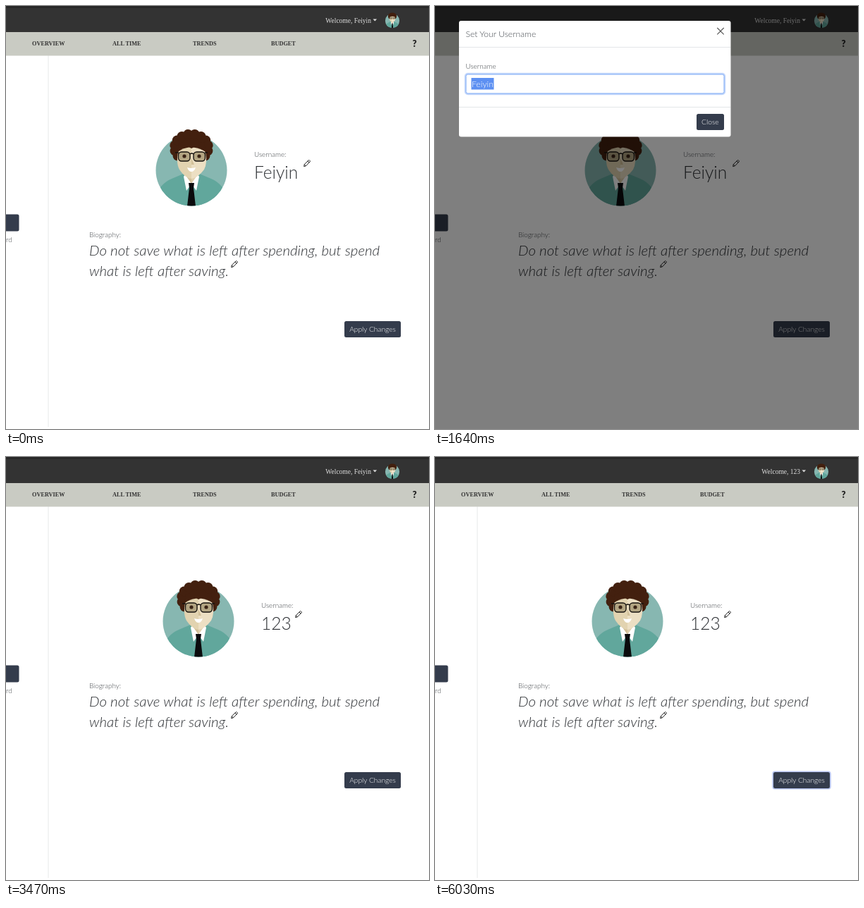
These frames come from a looping animation (600x600 px, 6.19 s). An HTML page:

```html
<!DOCTYPE html>
<html lang="en">
<head>
<meta charset="utf-8">
<title>Profile settings</title>
<style>
  html, body { margin: 0; width: 100%; height: 100%; overflow: hidden; background: #fff; }
  svg { display: block; width: 600px; height: 600px; }
  text { font: 300 10px Lato, "Open Sans", sans-serif; fill: #3c4043; white-space: pre; }
  .label { font-size: 9.9px; fill: #45494d; }
  .name { font-size: 24.5px; fill: #2c2f33; }
  .bio { font-size: 20.5px; font-style: italic; fill: #2c2f33; }
  .mid { font-size: 12.2px; fill: #454a50; }
  .button { font-size: 10.2px; fill: #fff; text-anchor: middle; }
  .welcome { font: 9.5px "Liberation Serif", serif; fill: #ddd; text-anchor: end; }
  .nav { font: bold 8.25px "Liberation Serif", serif; fill: #333; }
  .help { font: 900 13px Lato, sans-serif; fill: #222; text-anchor: middle; }
  .says { font: 9.2px "Open Sans", sans-serif; fill: #222; }
  .ok { font: 8px "Open Sans", sans-serif; fill: #fff; text-anchor: middle; }
  #alert { filter: drop-shadow(0 1px 2px rgba(0, 0, 0, .4)); }
</style>
</head>
<body>
<svg viewBox="0 0 600 600">
  <defs>
    <clipPath id="disc"><circle r="50.5"/></clipPath>
    <g id="avatar">
      <circle r="50.5" fill="#87b7b1"/>
      <g clip-path="url(#disc)">
        <path d="M-51 51V36Q-43 18 -28 12L-9 4H9L28 12Q43 18 51 36V51Z" fill="#61a79c"/>
        <path d="M-9 0H0V27L-9 12Z" fill="#d3c19a"/>
        <path d="M0 0H9V12L0 27Z" fill="#dfcfae"/>
        <path d="M-9 6L0 19L-7 29L-11 9ZM9 6L0 19L7 29L11 9Z" fill="#fff"/>
        <path d="M-4 18H4L3 25L6 51H-6L-3 25Z" fill="#0b0b0d"/>
      </g>
      <g id="hair" fill="#43200f"><ellipse cy="-33" rx="26" ry="21"/></g>
      <path d="M0-33Q-14-31-19-26Q-22-10-17-1Q-9 11 0 12Z" fill="#e2d3b0"/>
      <path d="M0-33Q14-31 20-26Q23-10 18-1Q9 11 0 12Z" fill="#ecdfc3"/>
      <path d="M-20-25Q-10-38 0-31Q12-38 21-25L18-38L0-45L-18-38Z" fill="#43200f"/>
      <g fill="#b3a582" stroke="#17130f" stroke-width="1.4">
        <rect x="-18.5" y="-26" width="16.5" height="13" rx="4.5"/>
        <rect x="3" y="-26" width="16.5" height="13" rx="4.5"/>
        <path d="M-23-25H-18M-2-23Q.5-25 3-23M19-25H23" fill="none"/>
      </g>
      <g fill="#3a2416"><circle cx="-10" cy="-20" r="2.6"/><circle cx="11" cy="-20" r="2.6"/></g>
      <path d="M0-17V-8H4Z" fill="#d3c19a"/>
      <path d="M-6-4Q0-2 6-4Q4 2 0 2T-6-4Z" fill="#fff"/>
    </g>
    <path id="pencil" d="M.6 9.6L1.3 6.6L7 .9Q7.7.3 8.4.9L9.1 1.6Q9.7 2.3 9.1 3L3.4 8.9ZM5.9 2L8 4.1M1.3 6.6L3.4 8.9"
      fill="none" stroke="#222" stroke-width="1"/>
  </defs>

  <rect width="600" height="600" fill="#fff"/>
  <path id="rule" d="M60 70V597" stroke="#e7e8e8"/>
  <rect width="600" height="37" fill="#333"/>
  <rect width="600" height="3" fill="#282828"/>
  <rect y="37" width="600" height="33.5" fill="#c9cbc3"/>
  <text class="welcome" id="welcome" x="518" y="23.5"/>
  <path d="M520.5 18.5h5.6l-2.8 2.9z" fill="#ddd"/>
  <use href="#avatar" transform="translate(548 21) scale(.2)"/>
  <text class="nav" x="37" y="56.3">OVERVIEW</text>
  <text class="nav" x="151" y="56.3">ALL TIME</text>
  <text class="nav" x="265" y="56.3">TRENDS</text>
  <text class="nav" x="376" y="56.3">BUDGET</text>
  <text class="help" x="579.5" y="58">?</text>

  <rect x="-20" y="295.5" width="38.5" height="24" rx="2.5" fill="#343c4c"/>
  <text class="label" x="0" y="335">rd</text>

  <use id="face" href="#avatar"/>
  <g id="user">
    <text class="label" y="214">Username:</text>
    <text class="name" id="name" y="244.5"/>
  </g>
  <use id="edit" href="#pencil" y="218"/>
  <text class="label" x="118" y="328">Biography:</text>
  <text class="bio" x="118" y="353.5">Do not save what is left after spending, but spend</text>
  <text class="bio" x="118" y="382.5">what is left after saving.</text>
  <use href="#pencil" x="319" y="361"/>
  <rect id="ring" x="479.3" y="446.5" width="81.4" height="24" rx="3" fill="none" stroke="#b7c4f0" stroke-width="2"/>
  <rect x="480" y="447" width="80" height="23" rx="2.5" fill="#343c4c"/>
  <text class="button" x="520" y="462">Apply Changes</text>

  <rect id="dim" width="600" height="600"/>

  <g id="modal">
    <rect x="34" y="21" width="385.5" height="164.5" rx="3" fill="#fff"/>
    <path d="M34 58.5H419M34 143.5H419" stroke="#e3e6e9"/>
    <text class="mid" x="43.5" y="44">Set Your Username</text>
    <path d="M400.3 31l9.4 9.4m0-9.4l-9.4 9.4" stroke="#555" stroke-width="1.1"/>
    <text class="label" x="43.5" y="88.5">Username</text>
    <rect id="glow" x="43" y="96" width="368" height="29" rx="3.5" fill="none" stroke="#c3d7fb" stroke-width="2.5"/>
    <rect id="field" x="44" y="97" width="366" height="27" rx="2.5" fill="#fff"/>
    <rect id="select" x="51.5" y="102" height="16.5" fill="#5d90f2"/>
    <text class="mid" id="input" x="52" y="114.8"/>
    <rect id="closeRing" x="370" y="152" width="41" height="25" rx="3.5" fill="none" stroke="#bcc6e6" stroke-width="2"/>
    <rect id="close" x="371" y="153" width="39" height="23" rx="2.5"/>
    <text class="button" x="390.3" y="168">Close</text>
  </g>

  <g id="alert">
    <rect x="92.5" y="1.2" width="268.5" height="77.3" rx="2.5" fill="#fff"/>
    <text class="says" x="102" y="21">localhost:3000 says</text>
    <text class="says" x="102" y="37" style="font-size:8px">Profile updated</text>
    <rect x="313" y="49.5" width="39" height="19.5" rx="2" fill="#5b8ce8"/>
    <text class="ok" x="332.3" y="62.3">OK</text>
  </g>
  <circle id="dot" r="7" fill="#f8e32c"/>
</svg>
<script>
const LOOP = 6190, OLD = "Feiyin", NEW = "123";
const el = id => document.getElementById(id);
const set = (id, attrs) => { for (const k in attrs) el(id).setAttribute(k, attrs[k]); };
const show = (id, on) => set(id, { visibility: on ? "visible" : "hidden" });
const during = (t, from, to) => t >= from && t < to;

// Value of the last [time, value] step that has been reached.
const step = (t, ...steps) => steps.filter(s => t >= s[0]).pop()[1];

// Curls along the outline of the hair.
for (let i = 0; i < 12; i++) {
  const a = Math.PI * (0.8 + i * 1.4 / 11);
  const curl = document.createElementNS("http://www.w3.org/2000/svg", "circle");
  curl.setAttribute("cx", 24 * Math.cos(a));
  curl.setAttribute("cy", -32 + 19.5 * Math.sin(a));
  curl.setAttribute("r", 7);
  el("hair").append(curl);
}

function draw(t) {
  const saved = t >= 3310;
  const shift = saved ? 10 : 0;
  el("welcome").textContent = "Welcome, " + (t >= 5870 ? NEW : OLD);
  el("name").textContent = saved ? NEW : OLD;
  set("face", { transform: `translate(${263 + shift} 233)` });
  set("user", { transform: `translate(${352 + shift})` });
  set("edit", { x: saved ? 410 : 422 });
  show("ring", t >= 4870);

  const dim = step(t, [0, 0], [580, .425], [760, .5], [3310, .25], [3470, 0]);
  set("dim", { opacity: dim });
  show("rule", !dim);
  set("modal", {
    opacity: step(t, [0, 0], [760, .8], [980, 1], [3310, 0]),
    transform: `translate(0 ${during(t, 760, 980) ? -8 : 0})`
  });
  const focused = during(t, 1320, 3140), selected = during(t, 1480, 2450);
  const closing = during(t, 3140, 3310);
  el("input").textContent = step(t, [0, OLD], [2450, "1"], [2630, "12"], [2970, NEW]);
  el("input").style.fill = selected ? "#fff" : "";
  set("select", { width: selected ? el("input").getComputedTextLength() + 1 : 0 });
  set("field", { stroke: focused ? "#7fabf5" : "#bcc5dc" });
  show("glow", focused);
  show("closeRing", closing);
  set("close", { fill: closing ? "#5a6582" : "#343c4c" });

  show("alert", during(t, 5030, 5700));
  const spot = step(t, [0, null], [410, [427, 224]], [580, null], [1320, [72, 111]], [1480, null],
    [3140, [397, 170]], [3310, null], [4870, [527, 460]], [5030, null], [5520, [334, 61]], [5700, null]);
  show("dot", spot);
  if (spot) set("dot", { cx: spot[0], cy: spot[1] });
}

function tick() {
  draw(performance.now() % LOOP);
  requestAnimationFrame(tick);
}
tick();
</script>
</body>
</html>
```
